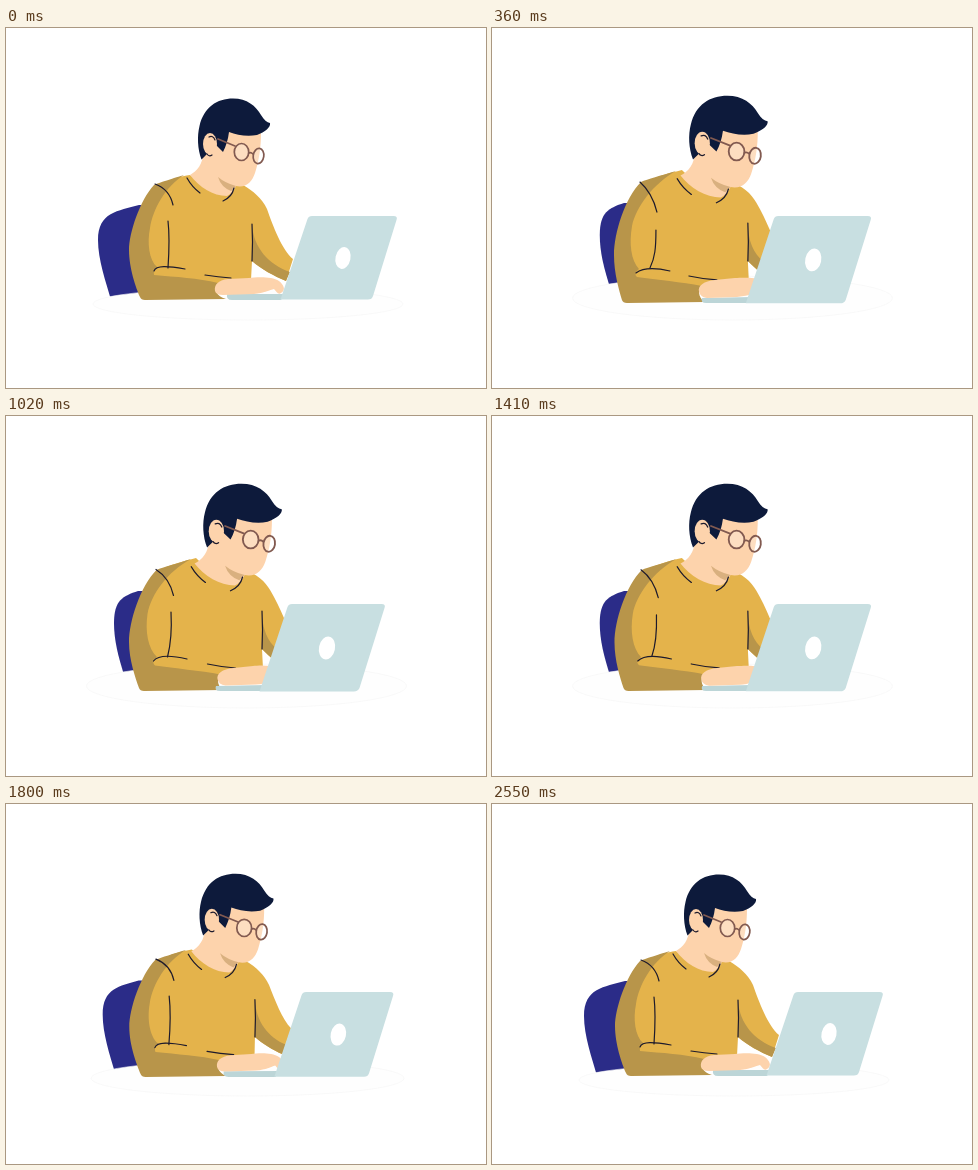
An HTML page that plays this animation: 480x360 px, repeating every 2.7 s.

```html
<!DOCTYPE html>
<html lang="en">
<head>
<meta charset="utf-8">
<title>Working at a laptop</title>
<style>
  html, body { margin: 0; width: 100%; height: 100%; overflow: hidden; background: #fff; }
  svg { display: block; width: 100vw; height: 100vh; }
  .line { fill: none; stroke: #1d1a2c; stroke-width: 1.2; stroke-linecap: round; }
  .glasses { fill: none; stroke: #825a50; stroke-width: 1.7; stroke-linecap: round; }
  .lens { fill: #fff; fill-opacity: .25; }
  .skin { fill: #fdd3ac; }
</style>
</head>
<body>
<svg viewBox="0 0 480 360">
  <g id="chair"></g>
  <ellipse id="table" fill="#fefefe" stroke="#f5f5f5" stroke-width=".6"/>
  <g id="body"></g>
  <g id="head">
    <path class="skin" d="M197 125C197 136 191 143 184 147C193 159 207 168 221 168Q227 165 230 158C240 160 246 154 249 145C253 132 255 120 255 104L215 98Z"/>
    <path fill="#d9b07f" d="M212 149Q219 155 230 158L225 163Q215 159 212 149Z"/>
    <path fill="#0d1a3b" d="M195.500 131.500C191.500 121 191 108 193.500 98C198 79 211 70.500 227 70.500C241 70.500 250 78 255 87C258 92 261 94.500 264 95C265 99 259 104 251 107C241 109 231 107 223 104C222 112 220 118 217 124L209 116L200 127Z"/>
    <ellipse class="skin" cx="204" cy="116" rx="7" ry="11"/>
    <path class="line" d="M203 109Q207 107 209 112M201 126Q203 129 206 127"/>
    <path class="glasses" d="M212 111L229 118M243 125Q245 124 247 126"/>
    <ellipse class="glasses lens" cx="235.500" cy="124" rx="7.200" ry="8.500"/>
    <ellipse class="glasses lens" cx="252.500" cy="128" rx="5.300" ry="7.700" transform="rotate(8 252.5 128)"/>
    <path class="line" d="M181 150Q186 159 194 165M228 160Q226 169 217 173"/>
  </g>
  <g id="front"></g>
  <ellipse id="badge" fill="#fff"/>
</svg>
<script>
const LOOP = 2700, STEP = 30;
const $ = id => document.getElementById(id);
const mix = (a, b, k) => a + (b - a) * k;
const NUM = /\d+(\.\d+)?/g;
const shapes = [];

// Poses: upright with arm back, leaning with arm back, upright with arm forward.
function shape(layer, style, back, lean, reach = back) {
  const el = document.createElementNS('http://www.w3.org/2000/svg', 'path');
  if (style === 'line') el.setAttribute('class', style);
  else el.setAttribute('fill', style);
  $(layer).append(el);
  const nums = d => d.match(NUM).map(Number);
  shapes.push({ el, back, p: nums(back), q: nums(lean), r: nums(reach) });
}

// Chair
shape('chair', '#2b2c88',
  'M105 272C100 254 92 232 92 212C92 184 112 183 133 177L160 177L160 272Z',
  'M119 262C112 240 108 224 108 207C108 184 117 180 132 175L160 175L160 262Z');
// Sweater
shape('body', '#e4b34b',
  'M150 158C165 151 175 148 184 147C200 160 220 160 237 157C247 163 256 170 261 181C267 198 276 222 287 231L280 253C268 248 255 241 246 233L245 252L220 262L134 254C132 235 132 200 150 158Z',
  'M150 156C165 148 178 145 190 142C205 158 230 158 246 157C258 163 264 173 268 181C273 190 277 200 281 209L268 244C264 241 260 237 256 233L257 253L228 262L134 256C132 235 132 200 150 156Z');
// Far sleeve
shape('body', '#b8954a',
  'M246 197C248 220 262 236 284 244L280 253C268 248 255 241 246 233Z',
  'M256 195C256 213 262 226 271 233L267 243C264 241 260 237 256 233Z');
shape('body', 'line', 'M246 196Q247 214 246 233', 'M256 195Q257 214 256 233');
// Near sleeve
shape('body', '#b8954a',
  'M176 147C162 151 152 154 145 157C131 172 121 205 121 224C121 242 125 260 128 269Q129 272 133 272L212 271C200 268 198 261 203 254C184 249 162 248 140 246Q139 243 143 239C137 230 137 217 141 200C145 182 158 160 176 147Z',
  'M184 143C168 148 156 151 149 154C133 170 122 205 122 227C122 245 127 262 130 272Q131 275 135 275L212 274C206 268 206 262 210 258C190 254 165 252 145 249Q141 246 147 241C139 232 137 216 140 198C144 179 161 156 184 143Z',
  'M178 147C165 151 155 154 148 157C134 172 123 205 123 222C123 240 130 260 134 269Q135 272 139 272L220 271C210 268 208 262 212 255C192 250 170 249 148 247Q147 243 151 239C143 232 141 215 144 200C147 181 159 159 178 147Z');
shape('body', 'line',
  'M145 157C153 163 159 174 162 186',
  'M148 154C156 161 162 172 165 184',
  'M149 156C160 160 165 168 167 177');
shape('body', 'line',
  'M160 205C160 220 159 230 155 238',
  'M164 202C164 220 163 230 158 240',
  'M162 193C164 210 163 225 162 240');
shape('body', 'line',
  'M141 243C149 238 160 239 173 241',
  'M144 245C152 239 165 240 178 243',
  'M148 243C150 237 162 238 179 241');
shape('body', 'line', 'M190 247Q203 249 216 250', 'M197 248Q211 251 225 252', 'M199 247Q212 249 225 250');
// Keyboard, hand, lid
shape('front', '#bcd5d7',
  'M221 266L280 266L275 272L226 272Q220 272 221 266Z',
  'M210 270L260 269L256 275L214 275Q208 275 210 270Z');
shape('front', '#fdd3ac',
  'M213 251C204 252 199 257 200 263Q201 268 208 268L238 267C248 265 258 263 264 261C268 263 272 265 275 263C280 261 276 255 270 252C262 249 245 250 235 250Z',
  'M223 252C212 253 206 258 207 263Q208 269 215 270L245 269C255 268 262 266 268 263C272 265 276 266 278 264C282 260 276 255 270 252C262 249 250 250 243 250Z',
  'M222 251C212 252 208 257 209 263Q210 267 217 267L248 266C258 265 264 262 268 261C271 264 272 267 275 265C280 262 278 257 273 253C266 248 250 249 243 250Z');
shape('front', '#c8dfe1',
  'M301.5 191Q302.5 188 306 188L387.5 188Q392 188 390.5 192L367 268Q366 271.6 362 271.6L274.5 271.6Z',
  'M281.5 191Q282.5 188 286 188L375.5 188Q380 188 378.5 192L353.5 272Q352 275.4 348 275.4L253.5 275.4Z');

// Each row: start, end, value reached, easing
const easeOut = x => 1 - (1 - x) ** 2.65;
const easeIn = x => x ** 1.9;
const smooth = x => x * x * (3 - 2 * x);
const leanTrack = [[0, 450, 1, easeOut], [1350, 1890, 0, easeIn]];
const armTrack = [
  [0, 150, 1, smooth], [600, 750, 0, smooth], [900, 1140, 1, smooth],
  [1350, 1530, 0, smooth], [1890, 2040, 1, smooth], [2400, 2550, 0, smooth]
];

function track(rows, t) {
  let v = 0;
  for (const [from, to, goal, ease] of rows) {
    if (t <= from) break;
    v = mix(v, goal, ease(Math.min(1, (t - from) / (to - from))));
  }
  return v;
}

function place(id, cx, cy, rx, ry) {
  const attrs = { cx, cy, rx, ry };
  for (const k in attrs) $(id).setAttribute(k, attrs[k]);
}

function draw(t) {
  const lean = track(leanTrack, t), reach = 1 - track(armTrack, t);
  for (const { el, back, p, q, r } of shapes) {
    let i = 0;
    el.setAttribute('d', back.replace(NUM, () => {
      const v = p[i] + lean * (q[i] - p[i]) + reach * (r[i] - p[i]);
      i++;
      return v.toFixed(2);
    }));
  }
  $('head').setAttribute('transform',
    `matrix(${1 + .09 * lean} 0 0 ${1 + .045 * lean} ${-12 * lean} ${-6 * lean})`);
  place('table', mix(242, 240.5, lean), mix(276, 270, lean), mix(155, 160, lean), mix(16, 22, lean));
  const x = mix(337, 321, lean), y = mix(230, 232, lean);
  place('badge', x, y, mix(7.5, 8, lean), mix(11, 11.5, lean));
  $('badge').setAttribute('transform', `rotate(12 ${x} ${y})`);
}

const start = performance.now();
function frame() {
  const t = (performance.now() - start) % LOOP;
  draw(Math.floor(t / STEP) * STEP);
  requestAnimationFrame(frame);
}
frame();
</script>
</body>
</html>
```
